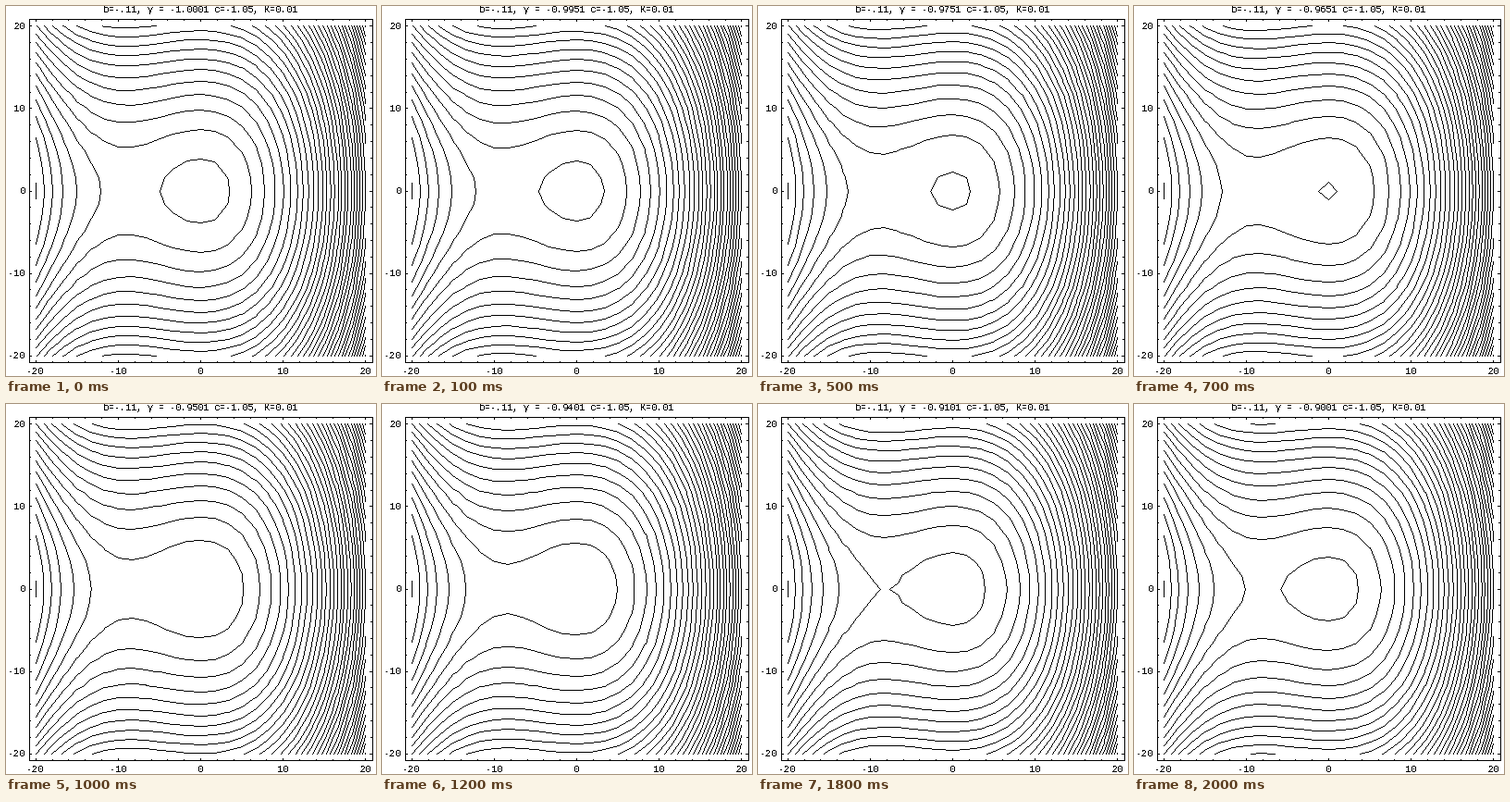
Write a matplotlib script that moves like this. It is 400 px wide and 400 px high and loops after 2100 ms.

```python
import numpy as np
import matplotlib.pyplot as plt
from matplotlib.animation import FuncAnimation

plt.rcParams.update({
    "font.family": "Liberation Mono",
    "font.size": 7.2,
    "text.antialiased": False,
    "text.hinting": "force_autohint",
    "text.hinting_factor": 1,
})

SIZE = 400
FRAMES, INTERVAL = 21, 100
CX, CY, UNIT = 210.65, 200.0, 8.916
B = 0.11
COUNT, FIRST, STEP = 40, 0.75, 20.09
EDGE = 20.8
MAJOR, MINOR = 0.25, 0.15

fig = plt.figure(figsize=(4, 4), dpi=100, facecolor="white")
ax = fig.add_axes([0, 0, 1, 1])
paper = ax.imshow(np.ones((SIZE, SIZE)), cmap="gray", vmin=0, vmax=1,
                  interpolation="nearest", extent=(0, SIZE, SIZE, 0))
ax.set(xlim=(0, SIZE), ylim=(SIZE, 0))
ax.axis("off")

grid = np.linspace(-20, 20, 25)
X, Y = np.meshgrid(grid, grid)


def stroke(canvas, points):
    """Draw a polyline in data units, one hard pixel wide."""
    x, y = np.transpose(points)
    pix = np.floor(np.column_stack([CX + UNIT * x, CY - UNIT * y]))
    for a, b in zip(pix[:-1], pix[1:]):
        n = int(abs(b - a).max()) + 1
        t = np.linspace(0, 1, n)[:, None]
        col, row = np.floor(a + t * (b - a) + 0.5).astype(int).T
        canvas[row, col] = 0


def draw_frame(canvas):
    e = EDGE
    stroke(canvas, [(-e, -e), (e, -e), (e, e), (-e, e), (-e, -e)])
    for v in range(-20, 21, 2):
        inner = e - (MINOR if v % 10 else MAJOR)
        for side in (-1, 1):
            stroke(canvas, [(v, side * e), (v, side * inner)])
            stroke(canvas, [(side * e, v), (side * inner, v)])


def label(x, y, text, ha="center"):
    return ax.text(x, y, text, ha=ha, va="baseline", color="black")


def contour_lines(gamma):
    z = -gamma * X**2 / 2 + B * X**3 / 3 + Y**2 / 2
    levels = z.min() + FIRST + STEP * np.arange(COUNT)
    contours = ax.contour(X, Y, z, levels)
    lines = [seg for level in contours.allsegs for seg in level]
    contours.remove()
    return lines


blank = np.ones((SIZE, SIZE))
draw_frame(blank)
for v in range(-20, 21, 10):
    label(CX - 0.5 + UNIT * v, 398, str(v))
    label(20.5, CY + 3 - UNIT * v, str(v), "right")
title = label(210, 7, "")


def update(i):
    gamma = -1.0001 + 0.005 * i
    canvas = blank.copy()
    for points in contour_lines(gamma):
        stroke(canvas, points)
    paper.set_data(canvas)
    title.set_text(f"b=-.11, γ = {gamma:.4f} c=-1.05, K=0.01")
    return paper, title


anim = FuncAnimation(fig, update, frames=FRAMES, interval=INTERVAL,
                     repeat=True, repeat_delay=0, blit=False)
plt.show()
```
